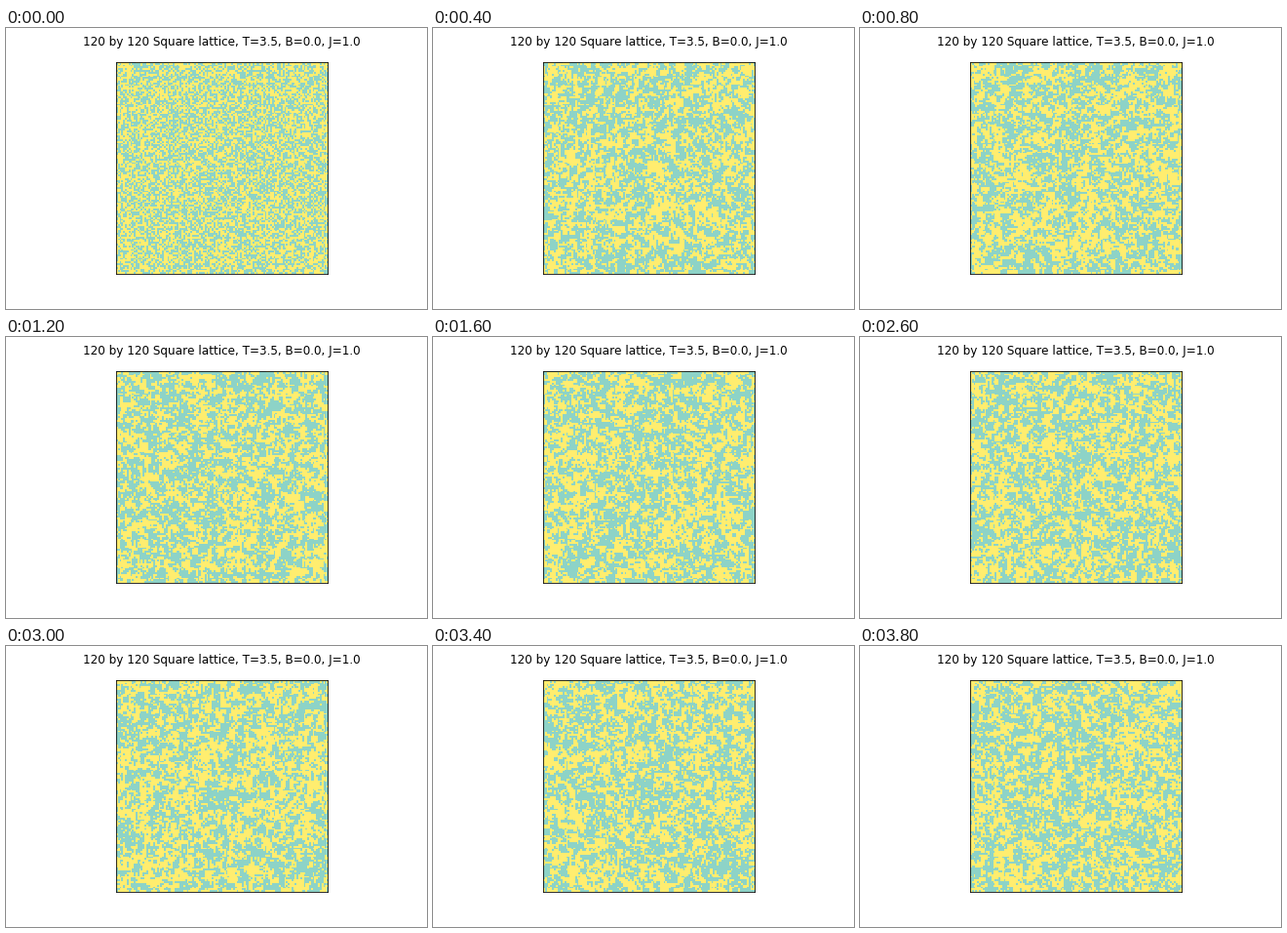
A matplotlib script for the animation above (4000 ms loop, 432x288 px).

```python
import numpy as np
import matplotlib.pyplot as plt
from matplotlib.animation import FuncAnimation

SIZE, T, B, J = 120, 3.5, 0.0, 1.0
FRAMES, INTERVAL = 20, 200

plt.rcParams["text.kerning_factor"] = 6  # whole-pixel glyph spacing

rng = np.random.default_rng(7)
row, col = np.indices((SIZE, SIZE))
parity = (row + col) % 2


def half_sweep(spins):
    """Metropolis step on a random half of each sublattice."""
    for colour in (0, 1):
        near = sum(np.roll(spins, s, axis) for s in (1, -1) for axis in (0, 1))
        cost = 2 * spins * (J * near + B)
        chosen = (parity == colour) & (rng.random(spins.shape) < 0.5)
        flip = chosen & (rng.random(spins.shape) < np.exp(-cost / T))
        spins = np.where(flip, -spins, spins)
    return spins


def simulate():
    spins = rng.choice([-1, 1], (SIZE, SIZE))
    states = [spins]
    for _ in range(FRAMES - 1):
        spins = half_sweep(half_sweep(spins))
        states.append(spins)
    return states


states = simulate()

fig, ax = plt.subplots(figsize=(6, 4), dpi=72, facecolor="white")
fig.subplots_adjust(left=0.125, right=0.9, bottom=0.125, top=0.88)
image = ax.imshow(states[0], cmap="Set3", vmin=-1, vmax=1,
                  interpolation="nearest")
ax.set_xticks([])
ax.set_yticks([])
ax.set_title(f"{SIZE} by {SIZE} Square lattice, T={T}, B={B}, J={J}",
             fontsize=12, family="DejaVu Sans", y=1.05, pad=6)


def update(i):
    image.set_data(states[i % FRAMES])
    return [image]


anim = FuncAnimation(fig, update, frames=FRAMES, interval=INTERVAL,
                     repeat=True, repeat_delay=0)
plt.show()
```
